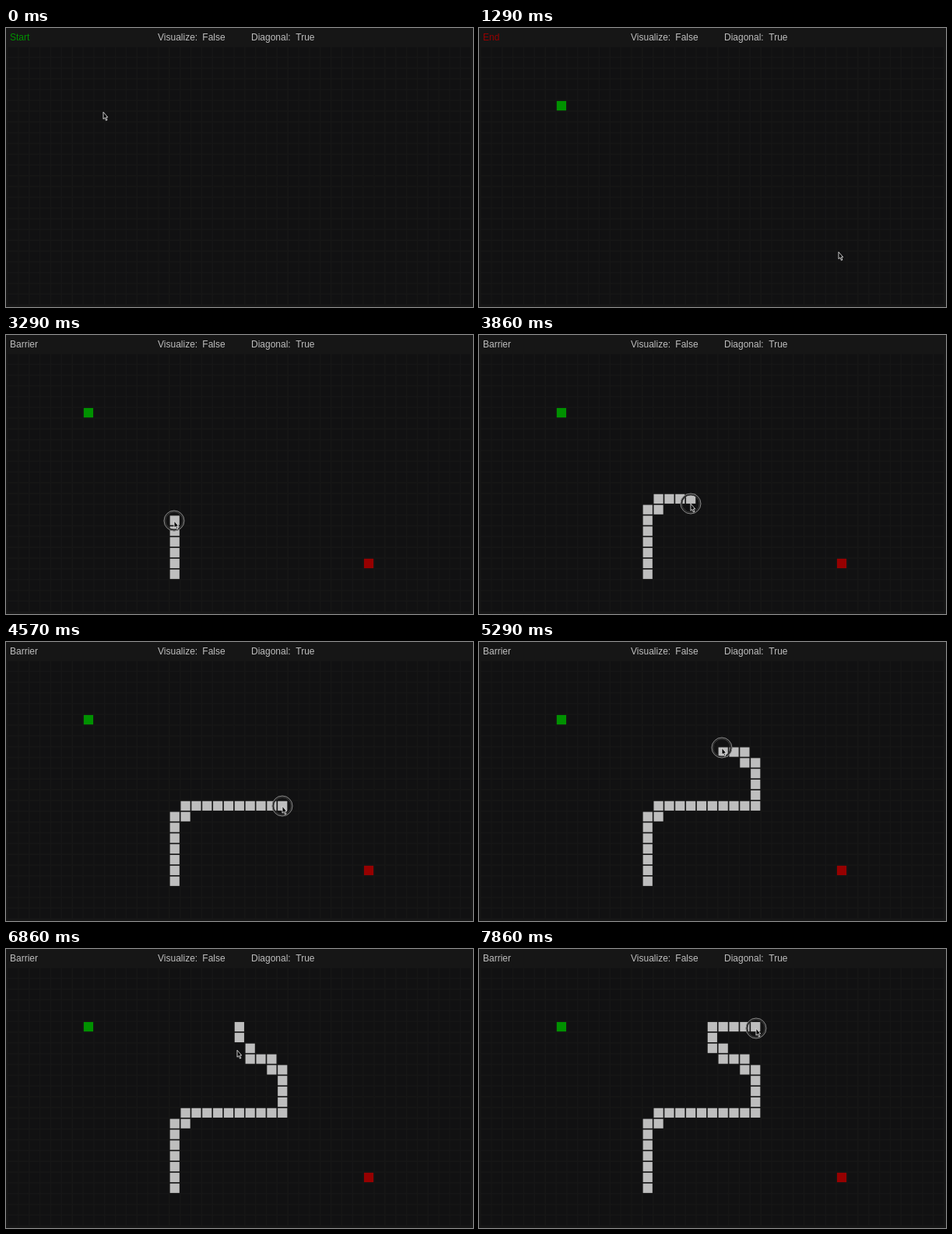
Write an HTML page that moves like this. It is 600 px wide and 359 px high and loops after 8000 ms.

```html
<!DOCTYPE html>
<html lang="en">
<head>
<meta charset="utf-8">
<title>Grid path editor</title>
<style>
  html, body { margin: 0; width: 100%; height: 100%; overflow: hidden; background: #161616; }
  svg { display: block; width: 600px; height: 359px; }
  text { font: 12px "Liberation Sans", Arial, sans-serif; fill: #bebebe; }
</style>
</head>
<body>
<svg viewBox="0 0 600 359">
  <g id="grid" fill="#111112"></g>
  <text id="mode" x="5" y="16"></text>
  <text x="195" y="16">Visualize:</text>
  <text x="252.3" y="16">False</text>
  <text x="315" y="16">Diagonal:</text>
  <text x="372.3" y="16">True</text>
  <g id="marks"></g>
  <g id="pointer">
    <g id="ring" fill="none">
      <circle r="12" stroke="#1a1a1a" stroke-width="2.4"/>
      <circle r="13" stroke="#8a8a8a"/>
      <circle r="11.2" stroke="#444" stroke-width=".8"/>
    </g>
    <path d="M0 .2V9.2L1.9 7.4L3.5 11L4.9 10.4L3.4 6.9H5.8Z"
          fill="#000" stroke="#e4e4e4" stroke-width=".9"/>
  </g>
</svg>
<script>
const FPS = 7, LAST = 55, LOOP = 8000, SAMPLES = 3;
const COLS = 43, ROWS = 24, PITCH = 13.85, SIZE = 12.2, LEFT = 2.9, TOP = 24.7;
const $ = id => document.getElementById(id);

// Each press paints with its mode; the last mode stays
const modes = [['Start', '#009100'], ['End', '#960000'], ['Barrier', '#bebebe']];
const presses = [[2, 3], [10, 11], [21, 40], [49, LAST]];

// Pointer: step, x, y
const path = [
  [0, 125, 108], [2, 106, 101], [3, 106, 101], [8, 471, 297], [9, 462, 288],
  [13, 462, 288], [20, 216, 308], [21, 216, 308], [23, 216, 239], [24, 216, 224],
  [25, 231, 224], [25.5, 231, 215], [27, 272, 217], [32, 355, 211], [34, 355, 155],
  [35, 342, 153], [35.5, 342, 142], [37, 312, 136], [38, 311, 129], [39, 302.4, 112.5],
  [40, 300, 105], [41, 300, 105], [45, 297, 130], [48, 297, 130], [49, 300, 128],
  [52, 300, 102], [53, 311, 101], [LAST, 356, 102]
];

function pointerAt(step) {
  const i = Math.max(1, path.findIndex(p => p[0] >= step));
  const [s0, x0, y0] = path[i - 1], [s1, x1, y1] = path[i];
  const u = (step - s0) / (s1 - s0);
  return [x0 + (x1 - x0) * u, y0 + (y1 - y0) * u];
}

const pressAt = step => presses.findIndex(([a, b]) => step >= a && step <= b);

function addCell(parent, col, row) {
  const rect = document.createElementNS('http://www.w3.org/2000/svg', 'rect');
  const attrs = { x: LEFT + PITCH * col, y: TOP + PITCH * row, width: SIZE, height: SIZE };
  for (const name in attrs) rect.setAttribute(name, attrs[name]);
  parent.append(rect);
  return rect;
}

for (let r = 0; r < ROWS; r++)
  for (let c = 0; c < COLS; c++) addCell($('grid'), c, r);

// Paint every cell the pressed pointer passes over
const marks = new Map();
const gap = (PITCH - SIZE) / 2;
for (let i = 0; i <= LAST * SAMPLES; i++) {
  const step = i / SAMPLES, press = pressAt(step);
  if (press < 0) continue;
  const [x, y] = pointerAt(step);
  const col = Math.floor((x - LEFT + gap) / PITCH), row = Math.floor((y - TOP + gap) / PITCH);
  const key = col + ',' + row;
  if (marks.has(key)) continue;
  const node = addCell($('marks'), col, row);
  node.style.fill = modes[Math.min(press, 2)][1];
  marks.set(key, { step, node });
}

function draw(step) {
  const [x, y] = pointerAt(step).map(Math.round);
  $('pointer').setAttribute('transform', `translate(${x} ${y})`);
  $('ring').style.display = pressAt(step) < 0 ? 'none' : '';
  for (const m of marks.values()) m.node.style.display = step >= m.step ? '' : 'none';
  const used = presses.filter(([from]) => step >= from).length;
  const [label, color] = modes[Math.min(used, 2)];
  $('mode').textContent = label;
  $('mode').style.fill = color;
}

let shown = -1;
const start = performance.now();
function tick() {
  const t = (performance.now() - start) % LOOP;
  const step = Math.min(LAST, Math.floor((t + 5) * FPS / 1000));
  if (step !== shown) draw(shown = step);
  requestAnimationFrame(tick);
}
tick();
</script>
</body>
</html>
```
